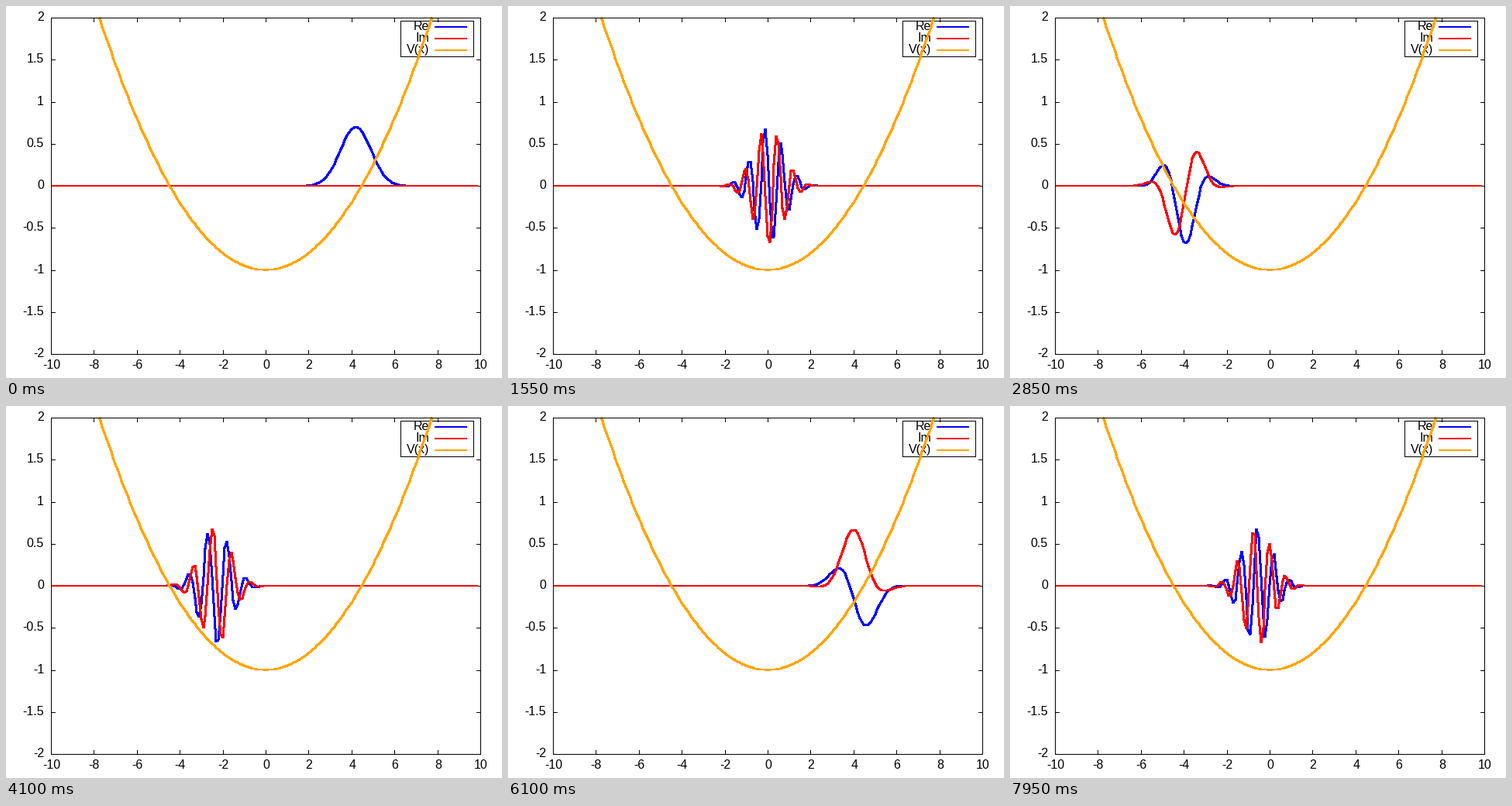
Recreate the animation shown at these times as a matplotlib script. Size 640 px wide and 480 px high, loop 8 s.

```python
import numpy as np
import matplotlib.pyplot as plt
from matplotlib.animation import FuncAnimation
from matplotlib.patches import Rectangle

W, H, DPI = 640, 480, 80
PT = 72 / DPI                              # points per pixel
LEFT, RIGHT, TOP, BOTTOM = 58, 612, 15, 449
FRAMES, INTERVAL = 160, 50

X0, ALPHA, AMP = 4.2, 2.0, 0.7             # start, inverse width squared, height
OMEGA = 2 * np.pi / 125                    # swing per frame
RATE = 0.9733                              # overall phase per frame

plt.rcParams["path.simplify"] = False
plt.rcParams["font.family"] = "Liberation Sans"
plt.rcParams["font.size"] = 16 * PT

fig = plt.figure(figsize=(W / DPI, H / DPI), dpi=DPI, facecolor="white")
ax = fig.add_axes([0, 0, 1, 1])
ax.set_xlim(0, W)
ax.set_ylim(H, 0)
ax.axis("off")


def px(x):
    return np.floor(LEFT + (np.asarray(x) + 10) * (RIGHT - LEFT) / 20 + 0.5)


def py(y):
    return np.floor(TOP + (2 - np.asarray(y)) * (BOTTOM - TOP) / 4 + 0.5)


def curve(x, y, color, z):
    line, = ax.plot(x, y, color=color, lw=2 * PT, zorder=z, antialiased=False,
                    snap=False, solid_capstyle="butt", solid_joinstyle="round")
    return line


def bar(x, y, w, h, z):
    ax.add_patch(Rectangle((x, y), w, h, fc="black", lw=0, zorder=z,
                           antialiased=False))


def frame_box(x0, y0, x1, y1, z):
    for y in (y0, y1):
        bar(x0, y, x1 - x0 + 1, 1, z)
    for x in (x0, x1):
        bar(x, y0, 1, y1 - y0 + 1, z)


def label(x, y, s, ha):
    ax.text(x, y, s, ha=ha, va="baseline", color="black", zorder=2)


# axes
frame_box(LEFT, TOP, RIGHT, BOTTOM, 9)
for v in range(-10, 11, 2):
    x = px(v)
    bar(x, TOP, 1, 6, 1)
    bar(x, BOTTOM - 5, 1, 6, 1)
    label(x + 0.8, 468, f"{v}", "center")
for v in np.arange(-2, 2.1, 0.5):
    y = py(v)
    bar(LEFT, y, 6, 1, 1)
    bar(RIGHT - 5, y, 6, 1, 1)
    label(49, y + 4, f"{v:g}", "right")

# key
frame_box(509, 19, 603, 65, 1)
for i, (name, color) in enumerate([("Re", "#0000ff"), ("Im", "#ff0000"),
                                   ("V(x)", "#ffa500")]):
    label(546.5, 31 + 15 * i, name, "right")
    curve([553, 595], [27 + 15 * i] * 2, color, 3 + i)

# curves
xs = np.arange(-100, 100) / 10
edge = np.sqrt(60)
vx = np.concatenate([[-edge], xs[np.abs(xs) < edge], [edge]])
re_line = curve(px(xs), py(0 * xs), "#0000ff", 3)
im_line = curve(px(xs), py(0 * xs), "#ff0000", 4)
curve(px(vx), py(vx ** 2 / 20 - 1), "#ffa500", 5)


def psi(n):
    """Coherent state swinging in the harmonic well."""
    xc = X0 * np.cos(OMEGA * n)
    p = -ALPHA * X0 * np.sin(OMEGA * n)
    phase = p * (xs - xc / 2) + RATE * n
    return AMP * np.exp(-ALPHA / 2 * (xs - xc) ** 2 + 1j * phase)


def draw(n):
    wave = psi(n)
    re_line.set_ydata(py(wave.real))
    im_line.set_ydata(py(wave.imag))
    return re_line, im_line


anim = FuncAnimation(fig, draw, frames=FRAMES, interval=INTERVAL,
                     repeat=True, repeat_delay=0)
plt.show()
```
